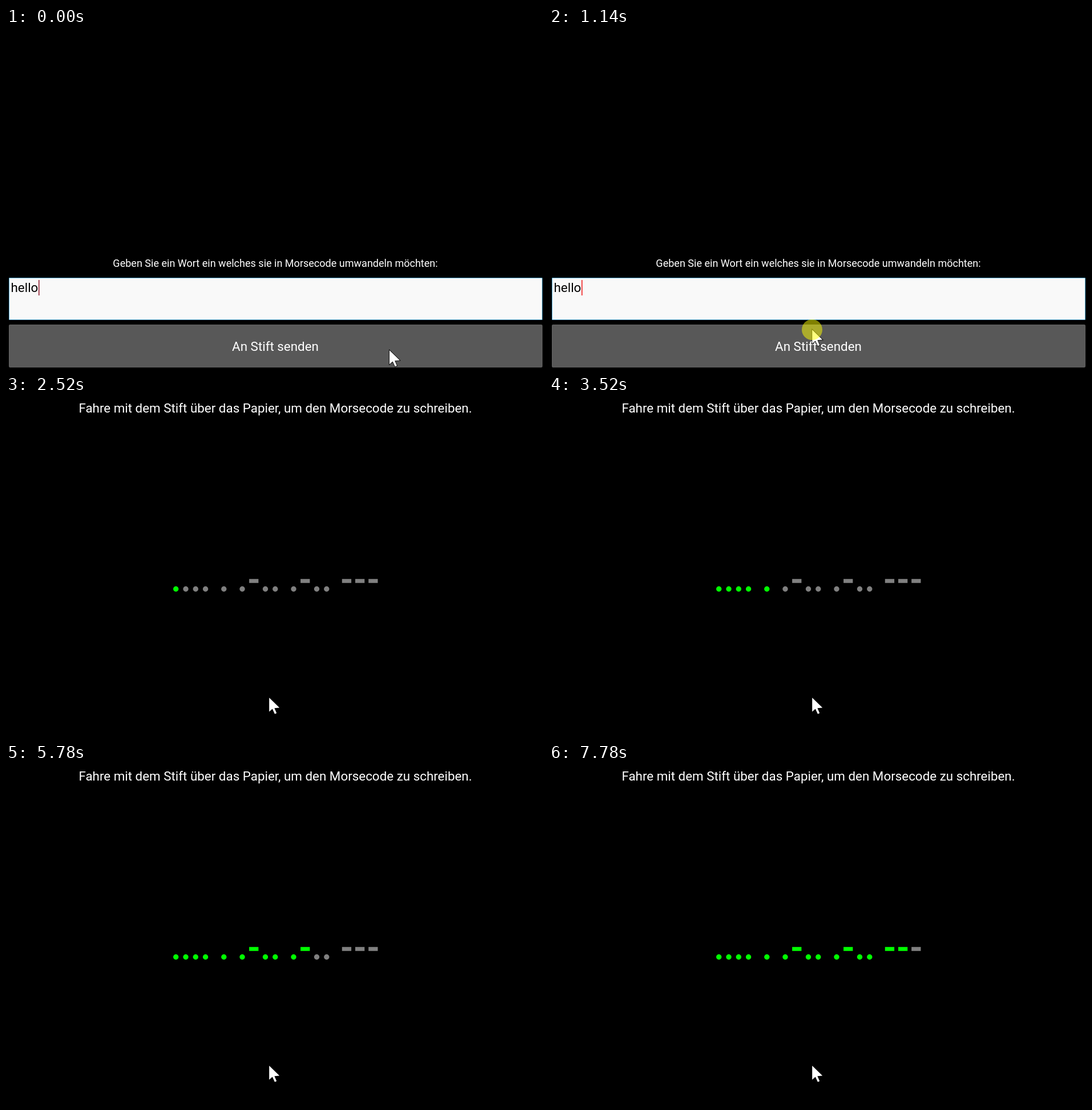
An HTML page with a canvas that plays this animation: 941x595 px, repeating every 8 s.

```html
<!DOCTYPE html>
<html lang="de">
<head>
<meta charset="utf-8">
<style>
html, body { margin: 0; width: 100%; height: 100%; overflow: hidden; background: #000; }
canvas { display: block; }
</style>
</head>
<body>
<canvas id="stage" width="941" height="595"></canvas>
<script>
const ctx = document.getElementById('stage').getContext('2d');
const LOOP = 8000;
const SEND_AT = 1250;
const LARGE = 22.38, SMALL = 18.05;
const MORSE = '.... . .-.. .-.. ---';
// Moment at which each morse sign turns green; the last one stays grey.
const LIT_AT = [2520, 2640, 2770, 2890, 3520, 4270, 4410, 5150,
                5400, 5650, 5780, 6140, 6270, 7020, 7780];
const POINTER = [[0, 0], [0, 24.5], [5.6, 19.6], [9.8, 28.4], [13, 27], [9.2, 18.2], [18, 17.6]];

function text(str, x, y, size, color, align = 'center') {
  ctx.font = `${size}px Roboto, sans-serif`;
  ctx.textAlign = align;
  ctx.fillStyle = color;
  ctx.fillText(str, x, y);
}

function box(x, y, w, h, color, radius = 0) {
  ctx.fillStyle = color;
  ctx.beginPath();
  ctx.roundRect(x, y, w, h, radius);
  ctx.fill();
}

function disc(x, y, r, color) {
  ctx.fillStyle = color;
  ctx.beginPath();
  ctx.arc(x, y, r, 0, 2 * Math.PI);
  ctx.fill();
}

function pointer(x, y) {
  ctx.beginPath();
  for (const [dx, dy] of POINTER) ctx.lineTo(x + dx, y + dy);
  ctx.closePath();
  ctx.lineWidth = 1.6;
  ctx.strokeStyle = '#000';
  ctx.stroke();
  ctx.fillStyle = '#fff';
  ctx.fill();
}

function drawForm(t) {
  text('Geben Sie ein Wort ein welches sie in Morsecode umwandeln möchten:', 472, 417.5, SMALL, '#fff');
  box(5, 437, 935, 74, '#62b5dc', 1);
  box(6, 438, 933, 72, '#f9f9f9');
  text('hello', 8.5, 462, LARGE, '#000', 'left');
  box(57, 441, 1.5, 27, t < 500 ? '#8c1428' : '#f01414');
  box(5, 519, 935, 75, '#626262', 2);
  box(6, 520, 933, 73, '#585858', 1);
  text('An Stift senden', 472, 565, LARGE, '#fff');

  const travel = t < 500 ? 0 : t < 620 ? 0.3 : t < 750 ? 0.8 : 1;
  pointer(672 - 210.8 * travel, 564 - 36 * travel);
  if (t >= 1010) disc(461, 528, 18, 'rgba(255, 255, 0, 0.5)');
}

function drawMorse(t) {
  text('Fahre mit dem Stift über das Papier, um den Morsecode zu schreiben.', 472, 28.5, LARGE, '#fff');
  let x = 289.05, index = 0;
  for (const sign of MORSE) {
    if (sign === ' ') {
      x += 14.9;
      continue;
    }
    const color = t >= LIT_AT[index++] ? '#0f0' : '#808080';
    if (sign === '.') {
      disc(x + 8.65, 337.7, 4.7, color);
      x += 17.3;
    } else {
      box(x + 3.45, 320.2, 16.3, 7, color);
      x += 23.2;
    }
  }
  pointer(461.2, 528);
}

function frame() {
  const t = performance.now() % LOOP;
  box(0, 0, 941, 595, '#000');
  if (t < SEND_AT) drawForm(t);
  else drawMorse(t);
  requestAnimationFrame(frame);
}
frame();
</script>
</body>
</html>
```
